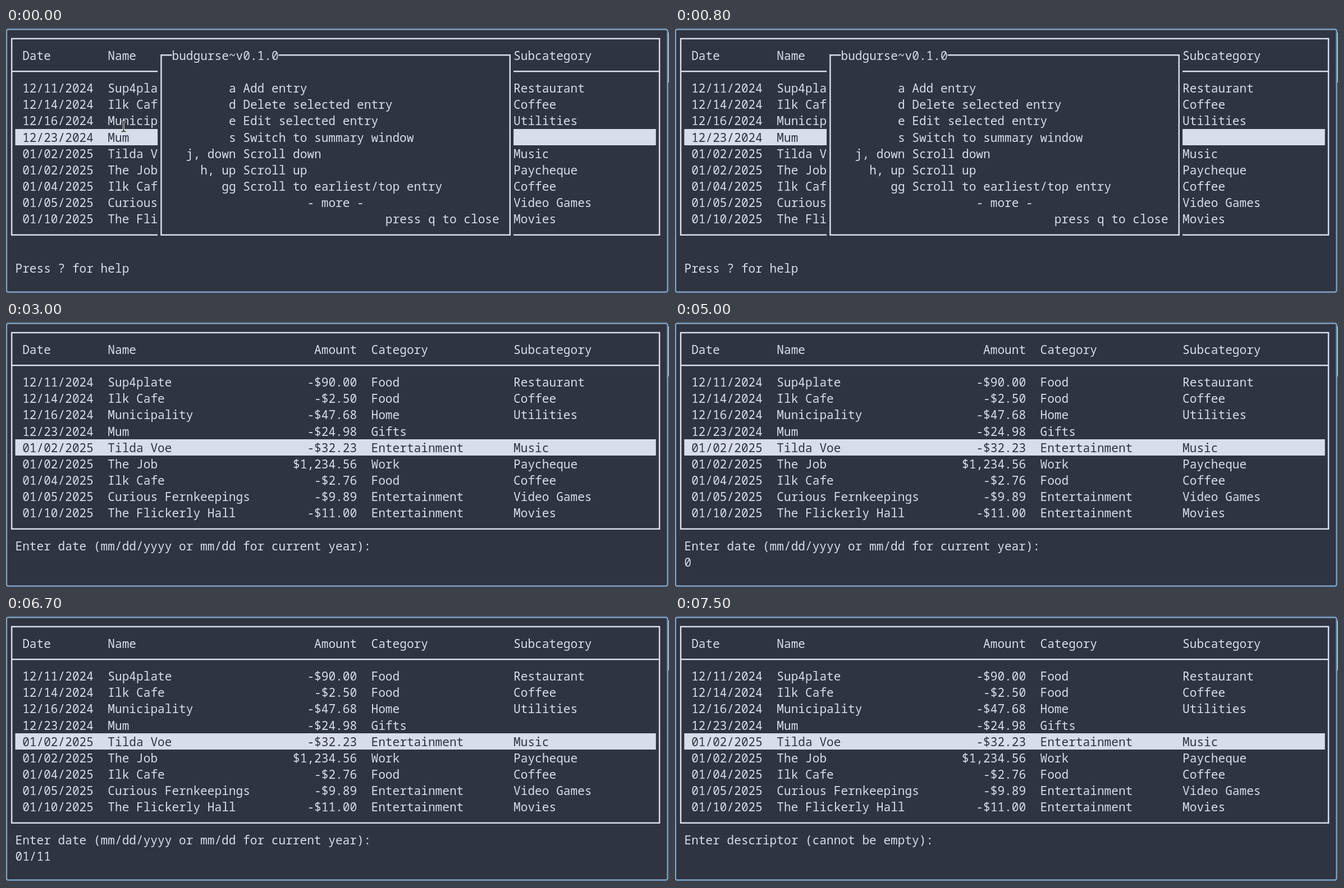
Animation of 1181x474 px, one loop 8000 ms. Source, as an HTML page:

```html
<!DOCTYPE html>
<html lang="en">
<head>
<meta charset="utf-8">
<title>Budget terminal</title>
<style>
html, body { margin: 0; width: 100%; height: 100%; overflow: hidden; background: #2e3440; }
svg { display: block; width: 100vw; height: 100vh; }
text { font: 21.13px "Noto Sans Mono", monospace; fill: #d8dee9; white-space: pre; }
text.dark { fill: #2e3440; }
.line { fill: none; stroke: #d8dee9; stroke-width: 2.5; }
</style>
</head>
<body>
<svg id="stage" viewBox="0 0 1181 474"></svg>
<script>
const LOOP = 8000, CELL = 12.68, LINE = 29.15;
const BG = '#2e3440', FG = '#d8dee9';
const stage = document.getElementById('stage');
const colX = col => 16.5 + col * CELL;
const rowY = row => 19 + row * LINE;

function add(parent, tag, attrs = {}) {
  const el = document.createElementNS('http://www.w3.org/2000/svg', tag);
  for (const key in attrs) el.setAttribute(key, attrs[key]);
  return parent.appendChild(el);
}

// Text on the terminal grid, with whole-pixel baselines.
function write(parent, col, row, str) {
  const el = add(parent, 'text', { x: colX(col), y: Math.round(rowY(row) + 8.7) });
  el.textContent = str;
  return el;
}

const line = (parent, d) => add(parent, 'path', { d, class: 'line' });

function box(parent, x, y, width, height, fill) {
  return add(parent, 'rect', { x, y, width, height, fill });
}

const entries = [
  ['12/11/2024', 'Sup4plate', '-$90.00', 'Food', 'Restaurant'],
  ['12/14/2024', 'Ilk Cafe', '-$2.50', 'Food', 'Coffee'],
  ['12/16/2024', 'Municipality', '-$47.68', 'Home', 'Utilities'],
  ['12/23/2024', 'Mum', '-$24.98', 'Gifts', ''],
  ['01/02/2025', 'Tilda Voe', '-$32.23', 'Entertainment', 'Music'],
  ['01/02/2025', 'The Job', '$1,234.56', 'Work', 'Paycheque'],
  ['01/04/2025', 'Ilk Cafe', '-$2.76', 'Food', 'Coffee'],
  ['01/05/2025', 'Curious Fernkeepings', '-$9.89', 'Entertainment', 'Video Games'],
  ['01/10/2025', 'The Flickerly Hall', '-$11.00', 'Entertainment', 'Movies']
];

const shortcuts = [
  ['a', 'Add entry'],
  ['d', 'Delete selected entry'],
  ['e', 'Edit selected entry'],
  ['s', 'Switch to summary window'],
  ['j, down', 'Scroll down'],
  ['h, up', 'Scroll up'],
  ['gg', 'Scroll to earliest/top entry']
];

function writeEntry(cells, row) {
  const group = add(stage, 'g');
  const cols = [1, 13, 48 - cells[2].length, 50, 70];
  cells.forEach((cell, i) => write(group, cols[i], row, cell));
  return group;
}

// Window frame
box(stage, 0, 0, 1181, 474, '#3b4252');
add(stage, 'rect', { x: 1, y: 2.5, width: 1177.4, height: 468, rx: 3,
  fill: BG, stroke: '#81a1c1', 'stroke-width': 2.4 });
box(stage, 1180, 8, 1, 89, FG);

// Table
const left = colX(-0.5), right = colX(90.5);
const highlight = box(stage, colX(0), 0, 90 * CELL, 29, FG);
line(stage, `M${left} ${rowY(0)}H${right}V${rowY(12)}H${left}ZM${left} ${rowY(2)}H${right}`);
writeEntry(['Date', 'Name', 'Amount', 'Category', 'Subcategory'], 1);
const rows = entries.map((entry, i) => writeEntry(entry, i + 3));
const prompt = write(stage, 0, 13, '');
const input = write(stage, 0, 14, '');

// Help popup
const popup = add(stage, 'g');
box(popup, colX(20), rowY(0.5), 50 * CELL, 12 * LINE, BG);
line(popup, `M${colX(22)} ${rowY(1)}H${colX(20.5)}V${rowY(12)}H${colX(69.5)}V${rowY(1)}H${colX(37)}`);
write(popup, 22, 1, 'budgurse~v0.1.0');
shortcuts.forEach(([key, action], i) => {
  write(popup, 31 - key.length, i + 3, key);
  write(popup, 32, i + 3, action);
});
write(popup, 41, 10, '- more -');
write(popup, 52, 11, 'press q to close');

// Mouse pointer
const pointer = add(stage, 'g', { fill: 'none' });
for (const [stroke, width] of [['#fff', 3.2], ['#000', 1.3]])
  add(pointer, 'path', { d: 'M205.5 166.5H208L209.5 168L211 166.5H213.5M209.5 168V183M205.5 184.5H208L209.5 183L211 184.5H213.5',
    stroke, 'stroke-width': width });

const show = (el, on) => el.setAttribute('visibility', on ? 'visible' : 'hidden');
const typedAt = [5000, 5400, 6200, 6600, 6700];

function render(t) {
  const selected = t < 3000 ? 3 : 4;
  highlight.setAttribute('y', Math.ceil(rowY(selected + 2.5)));
  rows.forEach((row, i) => {
    for (const el of row.children) el.setAttribute('class', i === selected ? 'dark' : '');
  });
  show(pointer, t < 800);
  show(popup, t < 900);
  prompt.textContent = t < 3000 ? ''
    : t < 7500 ? 'Enter date (mm/dd/yyyy or mm/dd for current year):'
    : 'Enter descriptor (cannot be empty):';
  input.textContent = t < 3000 ? 'Press ? for help'
    : t < 7500 ? '01/11'.slice(0, typedAt.filter(at => t >= at).length)
    : '';
}

const start = performance.now();
function tick() {
  render((performance.now() - start) % LOOP);
  requestAnimationFrame(tick);
}
tick();
</script>
</body>
</html>
```
